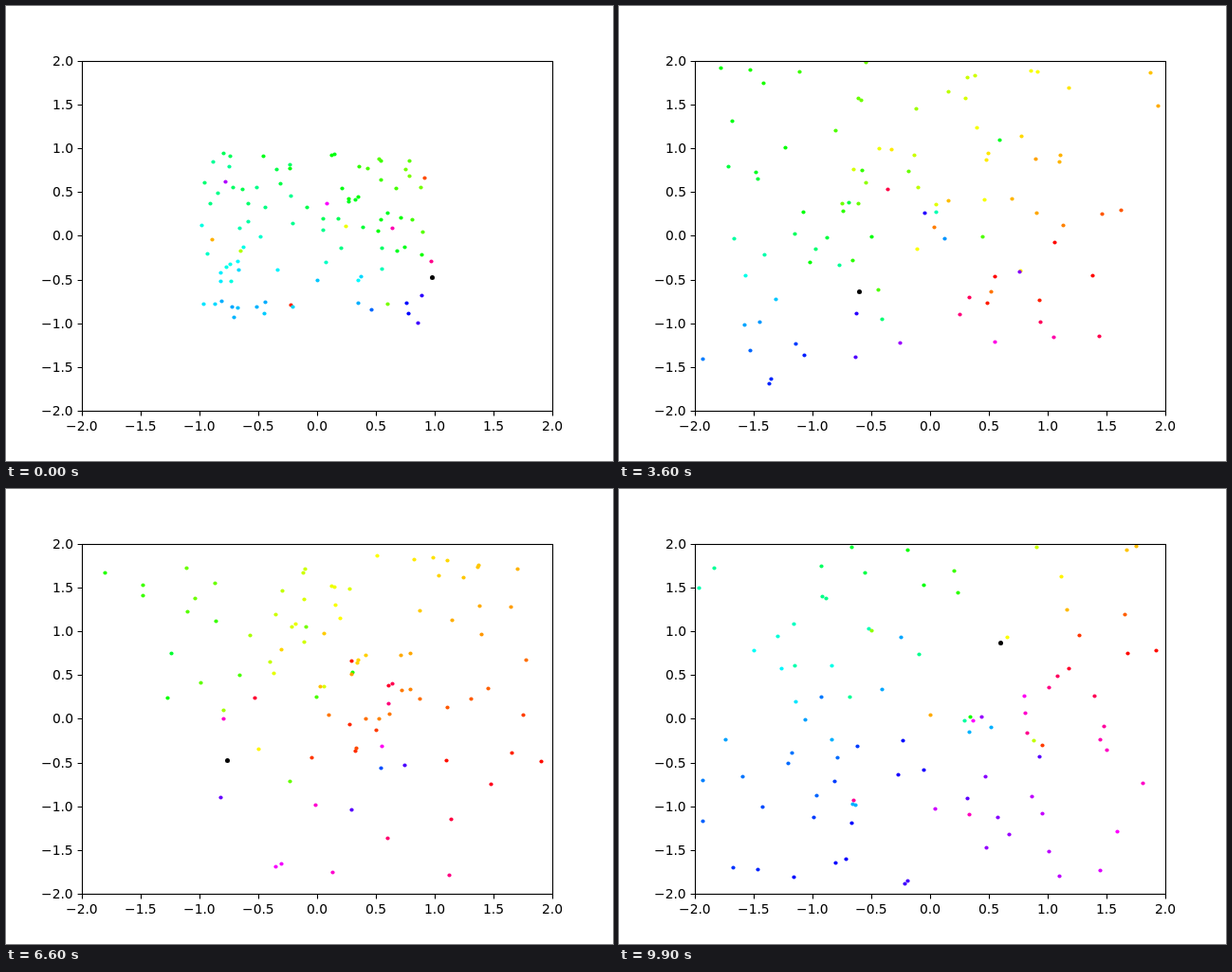
Animation of 640 by 480 pixels, one loop 10 s. Source, as an HTML page with a canvas:

```html
<!DOCTYPE html>
<html lang="en">
<head>
<meta charset="utf-8">
<title>Scatter</title>
<style>
  html, body { margin: 0; width: 100%; height: 100%; overflow: hidden; background: #fff; }
  canvas { display: block; }
</style>
</head>
<body>
<canvas id="stage" width="640" height="480"></canvas>
<script>
const ctx = document.getElementById('stage').getContext('2d');
const STEPS = 100, STEP_MS = 100, COUNT = 97;
const SPEED = 0.06, TURN = 0.25, STRAY = 0.15;
const TAU = Math.PI * 2;

// Plot coordinates (-2..2) to pixels
const px = x => 328 + x * 124;
const py = y => 242.4 - y * 92.4;

let seed = 20;
function rand() {
  seed = (seed * 1664525 + 1013904223) % 4294967296;
  return seed / 4294967296;
}
const spread = r => (rand() * 2 - 1) * r;

// Path of the black dot: step, x, y
const path = [
  [0, 0.976, -0.473], [15, 0.275, -0.085], [36, -0.597, -0.64], [50, -1.32, -1.18],
  [55, -1.145, -1.015], [66, -0.766, -0.475], [84, 0.113, 0.13], [99, 0.597, 0.87]
];

function hunterAt(s) {
  let i = 0;
  while (i < path.length - 2 && s > path[i + 1][0]) i++;
  const a = path[i], b = path[i + 1], dt = b[0] - a[0];
  const before = path[i - 1] || a, after = path[i + 2] || b;
  const u = (s - a[0]) / dt, u2 = u * u, u3 = u2 * u;
  const at = k => {
    const m0 = (b[k] - before[k]) / (b[0] - before[0]) * dt;
    const m1 = (after[k] - a[k]) / (after[0] - a[0]) * dt;
    return (2 * u3 - 3 * u2 + 1) * a[k] + (u3 - 2 * u2 + u) * m0 +
           (3 * u2 - 2 * u3) * b[k] + (u3 - u2) * m1;
  };
  return { x: at(1), y: at(2) };
}

const awayFrom = (h, x, y) => Math.atan2(y - h.y, x - h.x);

const newDot = () => ({ x: spread(1), y: spread(1), dir: rand() * TAU });

// At the start most dots already flee, a few still head elsewhere
function startDot() {
  const d = newDot();
  if (rand() > STRAY) d.dir = awayFrom(hunterAt(0), d.x, d.y) + spread(0.2);
  return d;
}

// Turn a little away from the hunter, move on, start anew once outside
function advance(d, h) {
  const away = awayFrom(h, d.x, d.y);
  const dir = Math.atan2(Math.sin(d.dir) + TURN * Math.sin(away),
                         Math.cos(d.dir) + TURN * Math.cos(away));
  const x = d.x + SPEED * Math.cos(dir), y = d.y + SPEED * Math.sin(dir);
  return Math.abs(x) > 2 || Math.abs(y) > 2 ? newDot() : { x, y, dir };
}

const states = [Array.from({ length: COUNT }, startDot)];
for (let s = 1; s < STEPS; s++) {
  const h = hunterAt(s);
  states.push(states[s - 1].map(d => advance(d, h)));
}

function drawDot(d, r, color) {
  ctx.fillStyle = color;
  ctx.beginPath();
  ctx.arc(Math.floor(px(d.x)) + 0.5, Math.floor(py(d.y)) + 0.5, r, 0, TAU);
  ctx.fill();
}

// Places the inked part of the text: align 0.5 centres it on x, 1 ends it there
function drawLabel(text, x, y, align) {
  const m = ctx.measureText(text);
  const left = -m.actualBoundingBoxLeft, width = m.actualBoundingBoxRight - left;
  ctx.fillText(text, Math.round(x - left - width * align), y);
}

function drawAxes() {
  ctx.strokeStyle = ctx.fillStyle = '#000';
  ctx.lineWidth = 1.11;
  ctx.strokeRect(80.5, 58.5, 496, 369);
  ctx.font = '13.89px "DejaVu Sans", sans-serif';
  ctx.beginPath();
  for (let v = -2; v <= 2; v += 0.5) {
    const label = (v < 0 ? '\u2212' : '') + Math.abs(v).toFixed(1);
    const x = Math.round(px(v)), y = Math.round(py(v));
    ctx.moveTo(x + 0.5, 427.5);
    ctx.lineTo(x + 0.5, 432.4);
    ctx.moveTo(80.5, y + 0.5);
    ctx.lineTo(75.6, y + 0.5);
    drawLabel(label, x, 448, 0.5);
    drawLabel(label, 70.3, y + 5, 1);
  }
  ctx.stroke();
}

function draw(now) {
  const s = Math.floor(now / STEP_MS) % STEPS;
  ctx.fillStyle = '#fff';
  ctx.fillRect(0, 0, 640, 480);
  ctx.save();
  ctx.beginPath();
  ctx.rect(80, 58, 496, 369);
  ctx.clip();
  for (const d of states[s]) drawDot(d, 2.1, `hsl(${d.dir * 360 / TAU}, 100%, 50%)`);
  drawDot(hunterAt(s), 2.5, '#000');
  ctx.restore();
  drawAxes();
}

let start = null;
function tick(now) {
  if (start === null) start = now;
  draw(now - start);
  requestAnimationFrame(tick);
}
draw(0);
requestAnimationFrame(tick);
</script>
</body>
</html>
```
